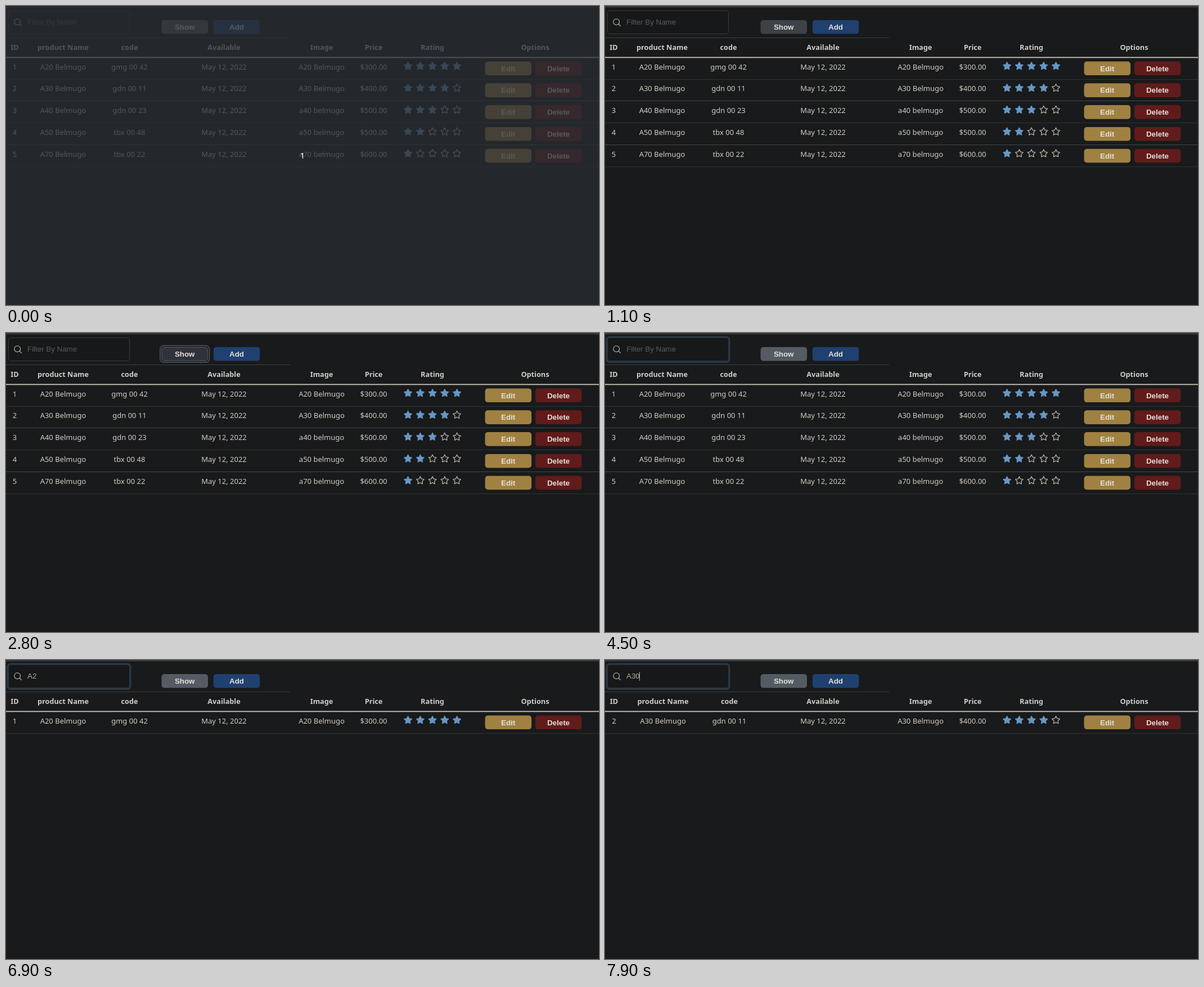
Animation of 1054 by 531 pixels, one loop 8000 ms. Source, as an HTML page:

```html
<!DOCTYPE html>
<html lang="en">
<head>
<meta charset="utf-8">
<title>Product table</title>
<style>
  html, body { margin: 0; width: 100%; height: 100%; overflow: hidden; background: #181a1b; }
  svg { display: block; font: 13px "Noto Sans", sans-serif; fill: #d1cdc7; }
  .head { font-weight: 700; font-size: 12.7px; }
  .mid { text-anchor: middle; }
  .button { font: 700 13.33px "Liberation Sans", sans-serif; fill: #e3e0da; text-anchor: middle; }
  .field { font: 13.33px "Liberation Sans", sans-serif; }
</style>
</head>
<body>
<svg id="stage" width="1054" height="531" viewBox="0 0 1054 531"></svg>
<script>
const LOOP = 8000, ROW = 38.8;
const stage = document.getElementById('stage');

const products = [
  ['A20 Belmugo', 'gmg 00 42', 'A20 Belmugo', 300, 5],
  ['A30 Belmugo', 'gdn 00 11', 'A30 Belmugo', 400, 4],
  ['A40 Belmugo', 'gdn 00 23', 'a40 belmugo', 500, 3],
  ['A50 Belmugo', 'tbx 00 48', 'a50 belmugo', 500, 2],
  ['A70 Belmugo', 'tbx 00 22', 'a70 belmugo', 600, 1],
].map(([name, code, image, price, stars], i) => ({ id: i + 1, name, code, image, price, stars }));

// Column centres
const withImage = { id: 15.5, name: 101.5, code: 219.5, date: 387.5, image: 561, price: 653.5, rating: 758, options: 940.5, show: 276.5, line: 505 };
const withoutImage = { id: 18, name: 113.5, code: 245.5, date: 433.5, price: 606, rating: 723, options: 927, show: 308.5, line: 565 };
const secondOnly = { ...withImage, id: 16, name: 103, code: 221 };
const titles = { id: 'ID', name: 'product Name', code: 'code', date: 'Available', image: 'Image', price: 'Price', rating: 'Rating', options: 'Options' };

const typed = [[0, ''], [5400, 'A'], [5900, 'A2'], [6100, 'A20'], [6900, 'A2'], [7200, 'A'], [7300, 'A3'], [7900, 'A30']];
const filters = [[0, ''], [6000, 'A2'], [7200, ''], [7300, 'A3']];

const NORMAL = [85, 91, 99], HOVER = [60, 66, 70], ACTIVE = [46, 50, 59];

const latest = (steps, t) => steps.filter(s => s[0] <= t).pop()[1];
const between = (t, a, b) => t >= a && t < b;
// Progress of a transition seen in n steps of 100 ms
const ramp = (t, start, n) => Math.max(0, Math.min(1, (Math.floor((t - start) / 100) + 1) / n));
const mix = (a, b, k) => a.map((v, i) => Math.round(v + (b[i] - v) * k));
const rgb = c => `rgb(${c})`;

const rect = (x, y, w, h, fill, more = '') => `<rect x="${x}" y="${y}" width="${w}" height="${h}" fill="${fill}" ${more}/>`;
const text = (x, y, s, cls = 'mid', more = '') => `<text x="${x}" y="${y}" class="${cls}" ${more}>${s}</text>`;
const outline = (color, width, opacity = 1) => `stroke="${color}" stroke-width="${width}" opacity="${opacity}"`;
const button = (x, y, label, fill) =>
  rect(x, y, 82.5, 24.6, fill, 'rx="5"') + text(x + 41.2, Math.round(y + 17), label, 'button');

function star(x, y, full) {
  const points = Array.from({ length: 10 }, (_, i) => {
    const r = i % 2 ? 3.7 : 7.2, a = i * Math.PI / 5;
    return (x + r * Math.sin(a)).toFixed(2) + ',' + (y - r * Math.cos(a)).toFixed(2);
  }).join(' ');
  return `<polygon points="${points}" fill="${full ? '#6697c5' : 'none'}" stroke="${full ? '#6697c5' : '#b5b0a7'}" stroke-width="1.3" stroke-linejoin="round"/>`;
}

function showColor(t) {
  if (t < 1500) return mix(NORMAL, HOVER, ramp(t, 1000, 2));
  if (t < 1600) return ACTIVE;
  if (t < 2800) return HOVER;
  if (t < 3400) return mix(ACTIVE, HOVER, ramp(t, 2900, 2));
  return mix(HOVER, NORMAL, ramp(t, 3400, 3));
}

function searchField(t) {
  const value = latest(typed, t), focus = ramp(t, 3900, 3);
  const border = mix(mix([56, 60, 62], [68, 74, 78], ramp(t, 3400, 3)), [31, 54, 82], focus);
  let out = rect(3, 7, 218, 44.5, 'none', `rx="5" ${outline('#30383e', 3, focus)}`);
  out += rect(4.5, 8.5, 215, 41, '#161819', `rx="4" ${outline(rgb(border), 1)}`);
  out += '<path d="M24.2 32.2L27.5 35.5M25.6 28.2a5.4 5.4 0 1 1-10.8 0a5.4 5.4 0 1 1 10.8 0" fill="none" stroke="#aaa59b" stroke-width="1.3" stroke-linecap="round"/>';
  out += text(38, 33, value || 'Filter By Name', 'field', `fill="${value ? '#b2ada3' : '#5b5d5c'}"`);
  if (between(t, 3900, 4500) || between(t, 5100, 6700) || t >= 7200) {
    const x = value ? 39.5 + 7.4 * value.length : 38;
    out += rect(Math.floor(x), 21, 1, 16, '#b2ada3');
  }
  return out;
}

function toolbar(t, cols) {
  const x = cols.show, ring = t < 1500 ? 0 : ramp(t, 1500, 2) - ramp(t, 3900, 3);
  return rect(x - 2.5, 22.5, 87.5, 29.6, 'none', `rx="6.5" ${outline('#43494d', 2, ring)}`)
    + button(x, 25, 'Show', rgb(showColor(t)))
    + rect(x + .5, 25.5, 81.5, 23.6, 'none', `rx="4.5" ${outline('#5b6267', 1, ring)}`)
    + button(x + 92.3, 25, 'Add', '#20406f');
}

function tableRow(p, i, cols) {
  const dy = ROW * i, base = Math.round(112.6 + dy);
  const cells = { id: p.id, name: p.name, code: p.code, date: 'May 12, 2022', image: p.image, price: `$${p.price}.00` };
  let out = '';
  for (const key in cells) if (cols[key]) out += text(cols[key], base, cells[key]);
  for (let k = 0; k < 5; k++) out += star(cols.rating + (k - 2) * 21.75, 106.9 + dy, k < p.stars);
  out += button(cols.options - 89, 98.5 + dy, 'Edit', '#a08142');
  out += button(cols.options + .3, 98.5 + dy, 'Delete', '#611b1b');
  return out + rect(0, Math.round(129.6 + dy), 1054, 1, i % 2 ? '#45494b' : '#303435');
}

function scene(t) {
  const filter = latest(filters, t);
  const cols = between(t, 1500, 2800) ? withoutImage : filter === 'A3' ? secondOnly : withImage;
  let out = rect(0, 0, 1054, 531, '#181a1b') + rect(0, 1, 1054, 1, '#55585a');
  out += searchField(t) + toolbar(t, cols);
  out += rect(0, 56, cols.line, 1, '#3c4042') + rect(0, 90.5, 1054, 1.8, '#c9c5be');
  for (const key in titles) if (cols[key]) out += text(cols[key], 78, titles[key], 'mid head');
  products.filter(p => p.name.startsWith(filter)).forEach((p, i) => out += tableRow(p, i, cols));
  if (t < 100) {
    out += rect(0, 1, 1054, 530, '#292d32', 'opacity=".75"');
    out += text(527, 271, '1', 'mid', 'fill="#fff" font-size="15"');
  }
  return out;
}

let shown = '';
function tick() {
  const markup = scene(performance.now() % LOOP);
  if (markup !== shown) stage.innerHTML = shown = markup;
  requestAnimationFrame(tick);
}
tick();
</script>
</body>
</html>
```
